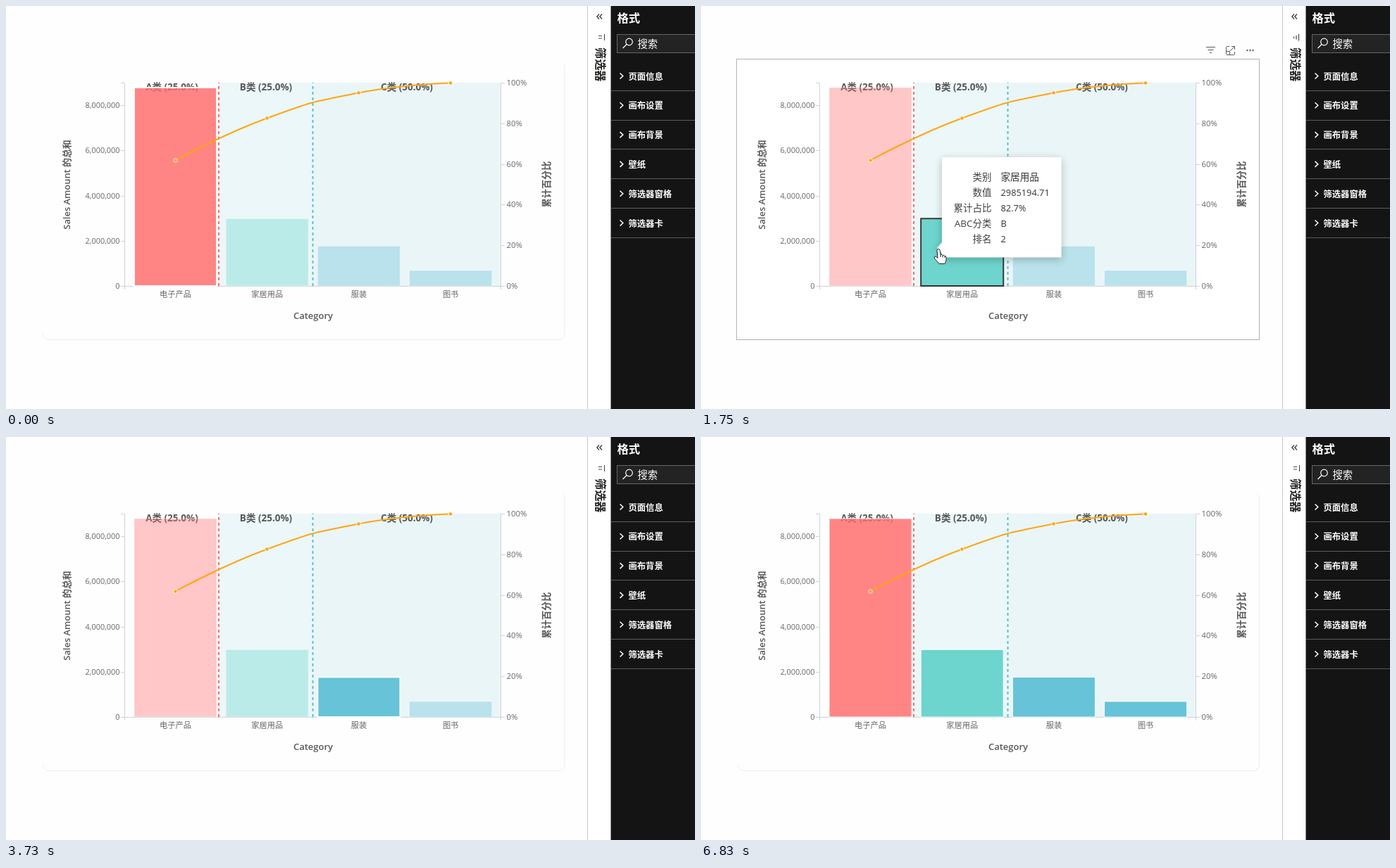
Animation, 978 px wide and 573 px high, one loop 8.83 s. Source, as an HTML page:

```html
<!DOCTYPE html>
<html lang="zh-CN">
<head>
<meta charset="utf-8">
<style>
html, body { margin: 0; width: 100%; height: 100%; overflow: hidden; background: #fefefe; }
svg { display: block; font-family: "Open Sans", "Noto Sans CJK SC", "Noto Sans CJK", sans-serif; }
.tip { filter: drop-shadow(0 3px 6px rgba(0, 0, 0, .24)); }
</style>
</head>
<body>
<svg id="stage" width="978" height="573" viewBox="0 0 978 573"></svg>
<script>
const LOOP = 8830, FADE = 240, BASE = 398, BAR_W = 117;
const stage = document.getElementById('stage');
const bars = [
  { name: '电子产品', value: '8776023.15', share: '61.7%', cls: 'A', fill: '#ff6b6b', top: 116, low: .375, high: .82 },
  { name: '家居用品', value: '2985194.71', share: '82.7%', cls: 'B', fill: '#4ecdc4', top: 302.3, low: .3, high: .8 },
  { name: '服装', value: '1768201.14', share: '95.1%', cls: 'C', fill: '#45b7d1', top: 341.4, low: .3, high: .8 },
  { name: '图书', value: '694120.93', share: '100.0%', cls: 'C', fill: '#45b7d1', top: 376, low: .3, high: .8 }
];
const linePoints = [[240.5, 219.5], [370.5, 159.5], [500.5, 123.5], [631, 109.5]];

// Timeline: [time, selected bar], -1 clears the selection
const selections = [[-FADE, 0], [560, -1], [1470, 1], [2720, -1], [3230, 2], [4960, 3], [6005, -1]];
const hovers = [[300, 1020], [1020, 2280], [2900, 3440], [4440, 6160]];
// Each tooltip: shown, starts to fade, track of [time, x, y]
const tips = [
  { from: 300, to: 640, path: [[300, 280, 220], [840, 300, 211]] },
  { from: 940, to: 2390, path: [[1800, 342, 215], [2330, 385, 263]] },
  { from: 2960, to: 3420, path: [[0, 508.5, 252.5]] },
  { from: 4740, to: 6160, path: [[0, 444, 270]] }
];
const pointer = [[0, 250, 600], [55, 250, 590], [60, 250, 477], [300, 262, 350], [840, 285, 340],
  [930, 285, 340], [960, 337, 345.5], [1800, 337, 345.5], [2330, 370, 390.5], [2800, 370, 390.5],
  [2980, 493, 380.5], [3340, 493, 380.5], [3620, 505, 580], [3840, 520, 580], [4030, 535, 427],
  [4120, 535, 427], [4330, 600, 293], [4560, 620.5, 395], [6160, 620.5, 395], [6800, 870, 575], [6830, 870, 620]];

const clamp = v => Math.max(0, Math.min(1, v));
const mix = (a, b, k) => a + (b - a) * k;
function track(path, t) {
  const i = path.findIndex(p => p[0] > t);
  if (i === 0) return path[0].slice(1);
  if (i < 0) return path[path.length - 1].slice(1);
  const [a, b] = [path[i - 1], path[i]], k = (t - a[0]) / (b[0] - a[0]);
  return [mix(a[1], b[1], k), mix(a[2], b[2], k)];
}

const text = (x, y, s, size = 11, fill = '#666', extra = '') =>
  `<text x="${x}" y="${y}" font-size="${size}" fill="${fill}" ${extra}>${s}</text>`;
const path = (d, stroke, width = 1, extra = '') =>
  `<path d="${d}" stroke="${stroke}" stroke-width="${width}" fill="none" ${extra}/>`;
const rect = (x, y, w, h, fill, extra = '') =>
  `<rect x="${x}" y="${y}" width="${w}" height="${h}" fill="${fill}" ${extra}/>`;
const END = 'text-anchor="end"', MID = 'text-anchor="middle"';
const BOLD = 'font-weight="700"', SEMI = 'font-weight="600"';
const upright = (x, y) => `${MID} ${SEMI} transform="rotate(-90 ${x} ${y})"`;

// Smooth curve: inner handles lie along the chord between the neighbouring points
function smooth(points) {
  const handle = (i, side) => {
    const p = points[i], a = points[i - 1], b = points[i + 1];
    return a && b ? p.map((v, n) => v + side * (b[n] - a[n]) / 4) : p;
  };
  return 'M' + points[0] + points.slice(1).map((p, i) => `C${handle(i, 1)} ${handle(i + 1, -1)} ${p}`).join('');
}

function card() {
  return path('M52 466Q54 474.5 62 474.5H783Q792.5 474.5 792.5 465V86Q792 82 789 80.5', '#eee', 1, 'id="idleCard"') +
    `<g id="activeCard">${rect(50.5, 75.5, 742, 399, '#fff', 'stroke="#b0b0b0"')}
    ${path('M717 58.5H730M719.5 62.5H727.5M722 66.5H725', '#605e5c', 1.2)}
    ${path('M750 57.5H746.5Q745.5 57.5 745.5 58.5V68.5Q745.5 69.5 746.5 69.5H756.5Q757.5 69.5 757.5 68.5V65M753 57.5H757.5V62M757.5 57.5L751 64M745.5 64.5H750.5V69.5', '#605e5c')}
    ${[775.5, 779.5, 783.5].map(x => `<circle cx="${x}" cy="63" r="1.2" fill="#605e5c"/>`).join('')}</g>`;
}

function chart() {
  let out = rect(302, 109, 133.5, 289, '#ebf7f8') + rect(435.5, 109, 267, 289, '#eaf5f8');
  [['A类 (25.0%)', 235.5], ['B类 (25.0%)', 369], ['C类 (50.0%)', 569]].forEach(([s, x]) =>
    out += text(x, 120, s, 13.5, '#595959', `${MID} ${BOLD}`));

  let ticks = 'M163 109.5H168.5V403M168.5 398.5H702.5M702.5 403V109.5';
  for (let i = 0; i < 5; i++) {
    const y = BASE - i * 64.2;
    ticks += `M163 ${Math.round(y) + .5}H168`;
    out += text(161.5, y + 4, (i * 2e6).toLocaleString('en-US'), 10.9, '#666', END);
  }
  for (let i = 0; i < 6; i++) {
    const y = BASE - i * 57.8;
    ticks += `M703 ${Math.round(y) + .5}H708`;
    out += text(710.5, y + 4, i * 20 + '%', 11.3);
  }
  out += path(ticks, '#cfd2d6');

  bars.forEach((b, i) => {
    b.x = 182 + 130.2 * i;
    const box = (fill, extra) => rect(b.x, b.top, BAR_W, BASE - b.top, fill, extra);
    out += box(b.fill, `id="bar${i}"`) + box('none', `id="ring${i}" stroke="#fff"`) +
      box('none', `id="edge${i}" stroke="#333" stroke-width="2"`) +
      text(b.x + BAR_W / 2, 414, b.name, 11.2, '#666', MID);
  });

  out += path('M302 398V109', '#ff6b6b', 2, 'stroke-dasharray="4 4"') +
    path('M435.5 398V109', '#58c1c8', 2, 'stroke-dasharray="4 4"') +
    path(smooth(linePoints), '#ffa510', 2);
  linePoints.forEach(([x, y], i) =>
    out += `<circle id="dot${i}" cx="${x}" cy="${y}" r="2.8" fill="#ffa510" stroke="#fff"/>`);

  return out + text(436, 445, 'Category', 13, '#595959', `${MID} ${SEMI}`) +
    text(91, 254, 'Sales Amount 的总和', 12.9, '#595959', upright(91, 254)) +
    text(772, 253.5, '累计百分比', 13.2, '#595959', upright(772, 253.5));
}

function panes() {
  let out = rect(825, 0, 34, 573, '#fff') + path('M825.5 0V573', '#c8c8c8') +
    path('M842 11.5L838.8 15L842 18.5M846 11.5L842.8 15L846 18.5', '#333', 1.2) +
    path('M841 42.5H846M841 46H846M849.5 40V49', '#444', 1.1, 'id="idleFilter"') +
    path('M841.5 43.5V46M845 42V47.5M848.5 40V49.5', '#444', 1.2, 'id="activeFilter"') +
    text(837.5, 59, '筛选器', 16.2, '#252423', `${BOLD} transform="rotate(90 837.5 59)"`) +
    rect(858.5, 0, 120, 573, '#141414') +
    text(867.5, 22.5, '格式', 16.3, '#fff', BOLD) +
    rect(867.5, 40.5, 120, 26, '#232323', 'stroke="#666"') +
    '<circle cx="884.5" cy="51" r="4.8" fill="none" stroke="#fff" stroke-width="1.2"/>' +
    path('M881 54.5L875.5 60', '#fff', 1.3) + text(896.5, 59, '搜索', 14.3, '#fff');
  ['页面信息', '画布设置', '画布背景', '壁纸', '筛选器窗格', '筛选器卡'].forEach((s, i) => {
    const y = 100 + 41.8 * i;
    out += path(`M871.5 ${y - 4.5}L875.8 ${y - .5}L871.5 ${y + 3.5}`, '#fff', 1.5) +
      text(883.5, y + 4.6, s, 12.3, '#fff', BOLD) +
      path(`M859 ${Math.floor(y + 20.2) + .5}H978`, '#5c5c5c');
  });
  return out;
}

function tooltip(b, i) {
  const last = i === 3, w = last ? 163 : 169.5, shift = last ? 1 : 0;
  const arrow = last ? `M${w} 121L${w + 7} 129L${w} 137Z` : 'M0 121L-7 129L0 137Z';
  const rows = [['类别', b.name], ['数值', b.value], ['累计占比', b.share], ['ABC分类', b.cls], ['排名', i + 1]];
  return `<g id="tip${i}" class="tip">${rect(0, 0, w, 142.5, '#fff')}<path d="${arrow}" fill="#fff"/>` +
    rows.map(([k, v], r) => text(70.5 + shift, 33 + 22 * r, k, 13.5, '#404040', END) +
      text(83.5 + shift, 33 + 22 * r, v, r ? 12.8 : 13.6, '#333')).join('') + '</g>';
}

const cursor = `<g id="cursor" fill="#fff" stroke="#222" stroke-linejoin="round">
  <path id="hand" d="M-2 2Q-2 0 0 0Q2 0 2.2 2L3 8Q5 7 6 9Q8 8 9 10Q11 9.5 11 12V15Q11 18 9 21H1Q-2 17 -5.5 13.5Q-7 11 -4.5 10.5Q-3 10.5 -1 13Z M3 8V11.5M6 9V12M9 10V12.5"/>
  <path id="arrow" d="M0 0V16L4 12.5L6.5 18.5L9 17.5L6.5 11.5H11.5Z"/></g>`;

stage.innerHTML = card() + chart() + panes() + bars.map(tooltip).join('') + cursor;
const el = {};
stage.querySelectorAll('[id]').forEach(n => el[n.id] = n);
const fade = (id, v) => {
  el[id].setAttribute('opacity', v);
  el[id].style.display = v > 0 ? '' : 'none';
};
const move = (id, x, y) => el[id].setAttribute('transform', `translate(${x} ${y})`);

function draw(t) {
  const s = selections.findLastIndex(e => e[0] <= t);
  const [since, now] = selections[s], before = s ? selections[s - 1][1] : now;
  const k = clamp((t - since) / FADE);

  bars.forEach((b, i) => {
    const lit = sel => sel < 0 || sel === i ? 1 : 0;
    const level = mix(lit(before), lit(now), k);
    const chosen = mix(+(before === i), +(now === i), k);
    const [start, stop] = hovers[i];
    const hover = Math.min(clamp((t - start) / 110), 1 - clamp((t - stop) / 150));
    fade('bar' + i, mix(b.low, b.high, level));
    fade('ring' + i, mix(.4, .9, level));
    el['ring' + i].setAttribute('stroke-width', 1 + chosen);
    fade('edge' + i, hover * mix(.42, 1, level));
    if (i === 0) {
      el.dot0.setAttribute('fill', level > .5 ? '#ff9a62' : '#ffa510');
      el.dot0.setAttribute('stroke', level > .5 ? '#fff2c8' : '#fff');
    }
    const tip = tips[i];
    fade('tip' + i, t < tip.from ? 0 : 1 - clamp((t - tip.to) / 200));
    move('tip' + i, ...track(tip.path, t));
  });

  const [x, y] = track(pointer, t);
  const inside = x > 50 && x < 793 && y < 475;
  const onBar = bars.some(b => x > b.x && x < b.x + BAR_W && y > b.top && y < BASE);
  move('cursor', x, y);
  fade('hand', +onBar);
  fade('arrow', +!onBar);
  fade('activeCard', +inside);
  fade('idleCard', +!inside);
  fade('activeFilter', +inside);
  fade('idleFilter', +!inside);
}

function tick() {
  draw(performance.now() % LOOP);
  requestAnimationFrame(tick);
}
tick();
</script>
</body>
</html>
```
